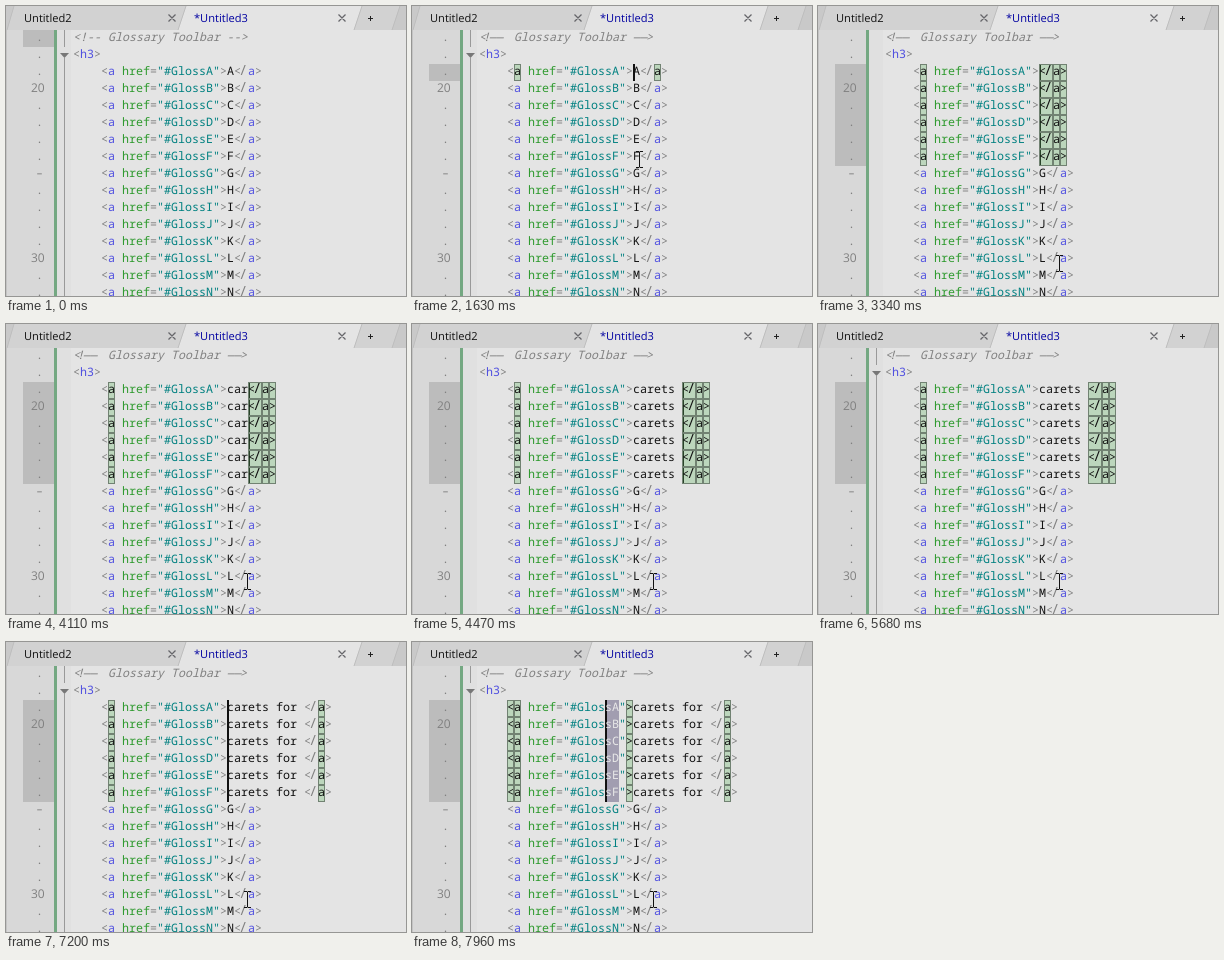
Write an HTML page that moves like this. It is 400 px wide and 290 px high and loops after 8 s.

```html
<!DOCTYPE html>
<html lang="en">
<head>
<meta charset="utf-8">
<style>
  html, body { margin: 0; width: 100%; height: 100%; overflow: hidden; background: #e4e4e4; }
  svg { display: block; }
  text { font: 11.667px "Noto Sans Mono", monospace; white-space: pre; text-rendering: geometricPrecision; }
  .tab { font: 11.1px "Open Sans", sans-serif; }
  .number { font: 12px "Open Sans", sans-serif; }
  .slash { font-size: 14px; }
  .comment { font-style: italic; }
</style>
</head>
<body>
<svg width="400" height="290" viewBox="0 0 400 290">
  <path d="M0 0H400V24H0Z" fill="#c9c9c9"/>
  <path d="M1 24L8 0H180L172 24Z" fill="#d2d2d2"/>
  <path d="M172 24L180 0H356L348 24Z" fill="#e4e4e4"/>
  <path d="M356 0L348 24H386L394 0Z" fill="#d2d2d2"/>
  <path d="M1 24L8 0M172 24L180 0M348 24L356 0M386 24L394 0" fill="none" stroke="#bebebe"/>
  <path d="M162.500 8.500l7 7m0-7l-7 7M332.500 8.500l7 7m0-7l-7 7" stroke="#66666a" stroke-width="1.300"/>
  <path d="M362 12.500h5m-2.500-2.500v5" stroke="#222"/>
  <text class="tab" x="18" y="16" fill="#111">Untitled2</text>
  <text class="tab" x="188" y="16" fill="#0000a0">*Untitled3</text>
  <path d="M0 24H48V290H0Z" fill="#d8d8d8"/>
  <path d="M0 24H1V290H0Z" fill="#c4c4c4"/>
  <path d="M48 24H51V290H48Z" fill="#74a882"/>
  <path d="M51 24H65V290H51Z" fill="#e0e0e0"/>
  <g id="editor"></g>
</svg>
<script>
const LOOP = 8000, CELL = 7, ROW = 17, TOP = 24, LEFT = 95;
const GREY = '#808080', BLUE = '#5050e0', GREEN = '#2f9a2f', TEAL = '#008080', BLACK = '#111';
const WORDS = 'carets for ';
const KEY_TIMES = [3670, 3840, 4110, 4170, 4310, 4390, 4470, 5840, 5980, 6065, 6150];
const CARET_TOGGLES = [1090, 2580, 3110, 4780, 5090, 5680, 5840, 6450, 6930, 7710, 7820];
// time, x, y
const MOUSE = [
  [70, 262, 216], [350, 237, 140], [560, 217, 56], [840, 220, 67], [1180, 220, 67],
  [1620, 227, 153], [1710, 227, 153], [1870, 221, 152], [2270, 221, 152], [2430, 249, 263], [2550, 241, 257]
];
const editor = document.getElementById('editor');
const passed = (times, t) => times.filter(time => time <= t).length;
const rowY = row => TOP + row * ROW;
const escape = s => s.replace(/</g, '&lt;').replace(/>/g, '&gt;');
const rect = (x, y, w, h, fill) => `<rect x="${x}" y="${y}" width="${w}" height="${h}" fill="${fill}"/>`;
const put = (x, row, s, fill, cls = '') =>
  `<text class="${cls}" x="${x}" y="${rowY(row) + 11}" fill="${fill}">${escape(s)}</text>`;
const box = (x, row, cells = 1) =>
  `<rect x="${x + .5}" y="${rowY(row) + .5}" width="${cells * CELL - 1}" height="16" fill="#60b560" fill-opacity=".3" stroke="#718272"/>`;

function mouse(t) {
  if (t < MOUSE[0][0]) return '';
  let [, x, y] = MOUSE[MOUSE.length - 1];
  const next = MOUSE.findIndex(key => key[0] > t);
  if (next > 0) {
    const a = MOUSE[next - 1], b = MOUSE[next], k = (t - a[0]) / (b[0] - a[0]);
    x = Math.round(a[1] + (b[1] - a[1]) * k);
    y = Math.round(a[2] + (b[2] - a[2]) * k);
  }
  return `<path d="M${x - 3} ${y - 7.5}h3l.5 .5l.5-.5h3M${x + .5} ${y - 7}v15M${x - 3} ${y + 8.5}h3l.5-.5l.5 .5h3" fill="none" stroke="#111"/>`;
}

function caretX(t, typed) {
  if (t >= 7960) return 193;
  if (t >= 7820) return 200;
  if (t >= 6930) return 284 - CELL * Math.min(11, Math.floor((t - 6930) / 30));
  return 221 + CELL * typed;
}

function gutter(first, last) {
  let out = rect(17, rowY(first), 31, (last - first + 1) * ROW, '#bcbcbc');
  for (let row = 0; row < 16; row++) {
    const line = row + 17;
    if (line % 10 === 0) out += put(25, row, String(line), GREY, 'number');
    else out += put(30, row, line % 5 ? '.' : '–', GREY);
  }
  return out;
}

function comment(joined) {
  if (!joined) return put(67, 0, '<!-- Glossary Toolbar -->', GREY, 'comment');
  return put(67, 0, '<', GREY, 'comment') + put(71, 0, '!', GREY, 'comment')
    + put(77, 0, '——', GREY, 'comment') + put(102, 0, 'Glossary Toolbar', GREY, 'comment')
    + put(221, 0, '——', GREY, 'comment') + put(234, 0, '>', GREY, 'comment');
}

function linkRow(row, t, active, typed, caret) {
  const letter = String.fromCharCode(63 + row);
  const content = active && t >= 3340 ? WORDS.slice(0, typed) : letter;
  const end = LEFT + CELL * (18 + content.length);
  const boxed = active && (row === 2 || t >= 2040);
  const wholeTag = boxed && t >= 3340 && t < 6450;
  const inTag = boxed && caret < 221;
  const selected = active && t >= 7820 ? (207 - caret) / CELL : 0;
  const link = '#Gloss' + letter, split = link.length - selected;
  let out = '';
  if (selected) out += rect(caret, rowY(row), selected * CELL, ROW, '#a19db0');
  if (active && passed(CARET_TOGGLES, t) % 2) out += rect(caret, rowY(row), 2, ROW, BLACK);
  if (boxed) out += box(102, row) + box(end + 14, row);
  if (inTag) out += box(LEFT, row) + box(214, row);
  if (wholeTag) out += box(end, row, 2) + box(end + 21, row);
  const name = boxed ? BLACK : BLUE, edge = inTag ? BLACK : GREY, close = wholeTag ? BLACK : GREY;
  return out + put(95, row, '<', edge) + put(102, row, 'a', name) + put(116, row, 'href', GREEN)
    + put(144, row, '=', GREY) + put(151, row, '"', TEAL) + put(158, row, link.slice(0, split), TEAL)
    + put(158 + split * CELL, row, link.slice(split), '#e8e8e8') + put(207, row, '"', TEAL)
    + put(214, row, '>', edge) + put(221, row, content, BLACK)
    + put(end, row, '<', close) + put(end + 5, row, '/', close, 'slash')
    + put(end + 14, row, 'a', name) + put(end + 21, row, '>', close);
}

function scene(t) {
  const first = t < 1090 ? 0 : 2;
  const last = t < 1090 ? 0 : t < 1980 ? 2 : 7;
  const typed = passed(KEY_TIMES, t), caret = caretX(t, typed);
  const foldHidden = (t >= 3340 && t < 4780) || (t >= 5840 && t < 6450);
  let out = gutter(first, last) + comment(first > 0);
  if (!foldHidden) out += '<path d="M58.500 24V41M58.500 52V290" stroke="#999"/><path d="M54 47H63L58.500 52Z" fill="#777"/>';
  out += put(67, 1, '<', GREY) + put(74, 1, 'h3', BLUE) + put(88, 1, '>', GREY);
  for (let row = 2; row < 16; row++)
    out += linkRow(row, t, first === 2 && row <= last, typed, caret);
  return out + mouse(t);
}

let shown = '';
function draw() {
  const html = scene(performance.now() % LOOP);
  if (html !== shown) editor.innerHTML = shown = html;
  requestAnimationFrame(draw);
}
draw();
</script>
</body>
</html>
```
